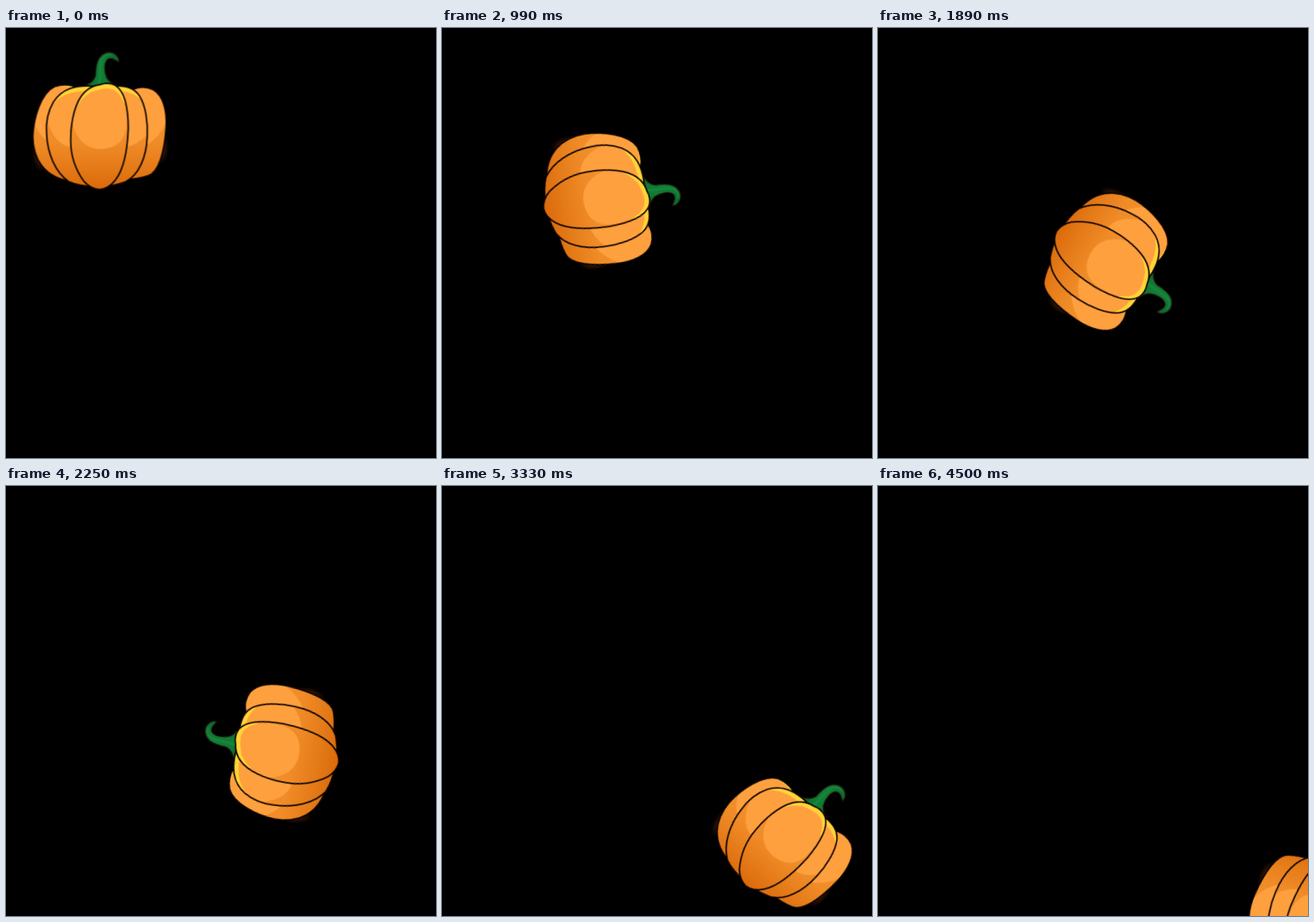
Animation, 500 px wide and 500 px high, one loop 4590 ms. Source, as an HTML page:

```html
<!DOCTYPE html>
<html lang="en">
<head>
<meta charset="utf-8">
<title>Rolling pumpkin</title>
<style>
  html, body { margin: 0; width: 100%; height: 100%; overflow: hidden; background: #000; }
  svg { display: block; width: 500px; height: 500px; }
  .line { fill: none; stroke: #0c0400; stroke-width: 1.7; }
</style>
</head>
<body>
<svg viewBox="0 0 500 500">
  <defs>
    <linearGradient id="skin" gradientUnits="userSpaceOnUse" x1="0" y1="66" x2="0" y2="187">
      <stop offset="0" stop-color="#f9952f"/>
      <stop offset=".55" stop-color="#f08c28"/>
      <stop offset=".8" stop-color="#e47a18"/>
      <stop offset="1" stop-color="#da690a"/>
    </linearGradient>
    <linearGradient id="green" x1="0" y1="0" x2="1" y2="0">
      <stop offset="0" stop-color="#0a5a24"/>
      <stop offset=".45" stop-color="#128037"/>
      <stop offset="1" stop-color="#0b662a"/>
    </linearGradient>
    <radialGradient id="glow">
      <stop offset=".4" stop-color="#3a1a08"/>
      <stop offset="1" stop-color="#3a1a08" stop-opacity="0"/>
    </radialGradient>
  </defs>
  <g id="roller"><g id="pumpkin" transform="translate(-108.3 -107.4)"></g></g>
</svg>
<script>
  const NS = 'http://www.w3.org/2000/svg';
  const STEPS = 51, STEP_MS = 90, SHIFT = 8, TURN = 40;
  const START = { x: 108.5, y: 108.2 };
  const pumpkin = document.getElementById('pumpkin');
  const defs = document.querySelector('defs');

  function add(parent, tag, attrs) {
    const el = document.createElementNS(NS, tag);
    for (const key in attrs) el.setAttribute(key, attrs[key]);
    return parent.appendChild(el);
  }

  // Back to front: outline, yellow rim, highlight.
  const lobes = [
    {
      shape: 'M86 69C76 65 66 64 57 67C40 75 32 104 31 125C31 151 44 174 78 178L100 180Z',
      rim: 'M86 69C76 64 66 63 55 68L66 68L80 73Z',
      light: 'M84 71C74 67 66 66 57 68C40 76 33 98 33 112C40 127 52 136 70 138Z'
    },
    {
      shape: 'M144 72C154 67 163 67 171 71C183 78 187 96 186 114C184 145 177 167 165 171Q153 175 140 175Z',
      rim: 'M140 76C152 67 164 66 172 71L160 70L146 75Z',
      light: 'M145 72C156 67 166 68 173 73C183 82 187 96 186 109Q178 128 160 137Z'
    },
    {
      shape: 'M103 67C80 65 65 70 55 85C48 97 46 110 47 122C48 145 57 167 73 178Q84 183 106 184Z',
      rim: 'M106 64C83 65 64 70 53 88C64 78 76 73 90 73Z',
      light: 'M100 73C78 72 64 77 54 88C49 97 47 104 48 108C54 126 63 137 78 138Z'
    },
    {
      shape: 'M122 67C138 65 149 69 155 78C162 89 165 108 164 126C163 150 154 170 139 178Q129 182 112 184Z',
      rim: 'M124 65C139 65 150 69 157 83C149 76 144 75 136 74Z',
      light: 'M130 73C143 72 151 77 157 85C162 95 165 110 164 123Q153 136 136 138Z'
    },
    {
      shape: 'M109 65C115 63 122 63 127 66C138 73 142 94 142 116C141 142 137 163 127 176Q118 187 108 187Q98 186 90 177C80 163 75 146 75 130C75 105 81 84 91 74Q99 66 109 65Z',
      rim: 'M80 94C84 78 97 63 111 63H124C134 65 138 77 140 90L128 74H98Z',
      light: 'M108 71C118 68 127 70 132 77C139 87 141 101 140 113C138 131 127 140 109 140C92 140 80 126 77 108C78 93 89 75 108 71Z'
    }
  ];

  for (const [cx, cy, rx, ry] of [[40, 143, 10, 24], [179, 138, 10, 20]])
    add(pumpkin, 'ellipse', { cx, cy, rx, ry, fill: 'url(#glow)' });

  add(pumpkin, 'path', {
    d: 'M89 67Q102 63 104 54C104 41 107 31 116 28C124 25 132 32 131 39C127 37 124 33 119 35C113 39 114 50 117 57Q121 64 132 67L124 72H96Z',
    fill: 'url(#green)', stroke: '#20160a', 'stroke-width': 1.2
  });
  add(pumpkin, 'path', {
    d: 'M108 63C111 54 108 43 112 35Q116 29 123 31',
    fill: 'none', stroke: '#23984a', 'stroke-width': 1.5, opacity: .5
  });

  lobes.forEach(({ shape, rim, light }, i) => {
    add(add(defs, 'clipPath', { id: 'lobe' + i }), 'path', { d: shape });
    const g = add(pumpkin, 'g', { 'clip-path': `url(#lobe${i})` });
    add(g, 'path', { d: shape, fill: 'url(#skin)' });
    add(g, 'path', { d: rim, fill: '#ffd438' });
    add(g, 'path', { d: light, fill: '#ffa03e' });
    add(pumpkin, 'path', { d: shape, class: 'line' });
  });

  const pose = step => ({
    transform: `translate(${START.x + step * SHIFT}px, ${START.y + step * SHIFT}px) rotate(${step * TURN}deg)`
  });

  document.getElementById('roller').animate([pose(0), pose(STEPS)], {
    duration: STEPS * STEP_MS,
    iterations: Infinity,
    easing: `steps(${STEPS}, end)`
  });
</script>
</body>
</html>
```
